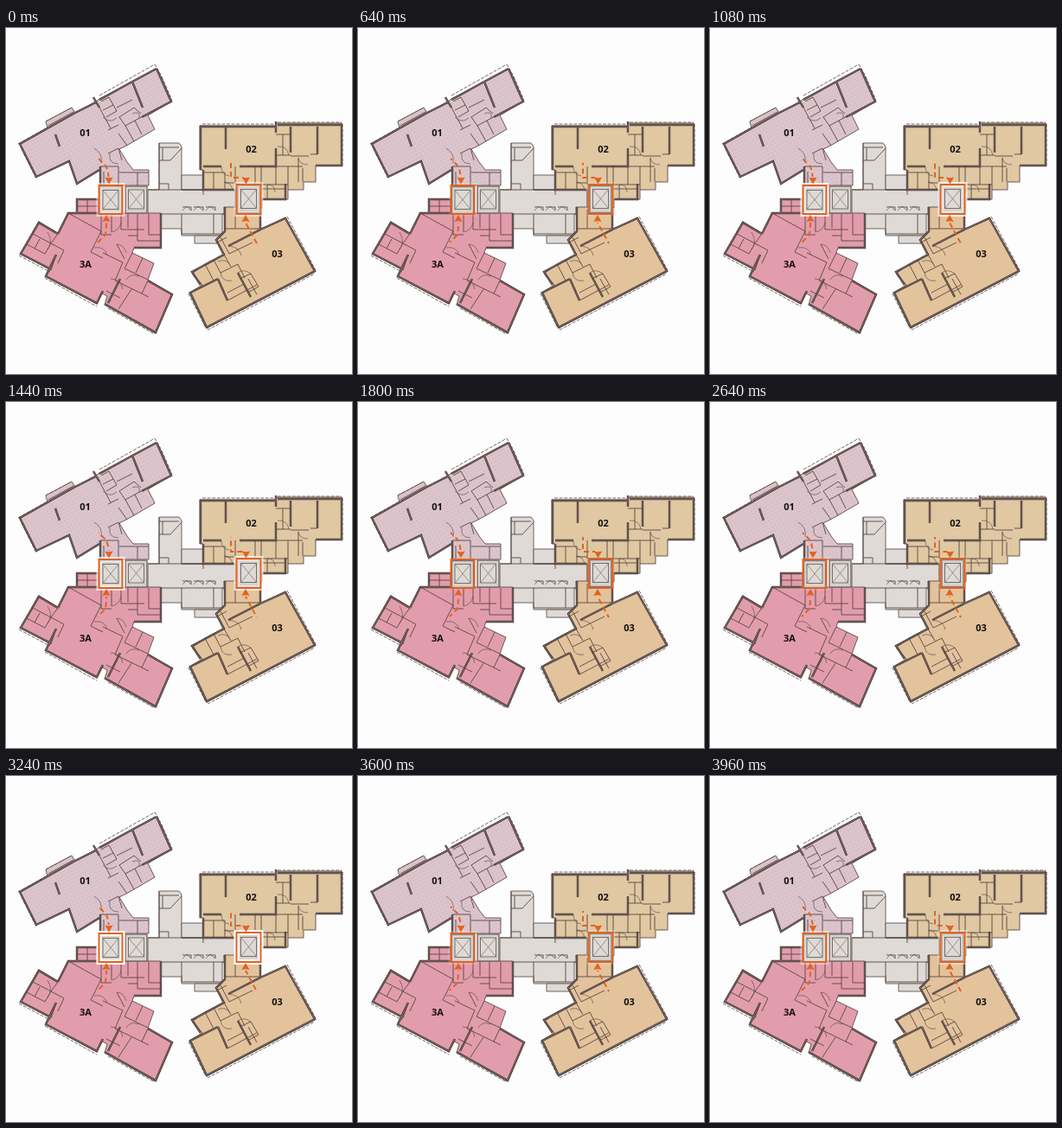
An HTML page for the animation above (4000 ms loop, 400 by 400 pixels).

```html
<!DOCTYPE html>
<html lang="en">
<head>
<meta charset="utf-8">
<title>Floor plan</title>
<style>
  html, body { margin: 0; width: 100%; height: 100%; overflow: hidden; background: #fdfdfd; }
  svg { display: block; width: 100vw; height: 100vh; }
  .unit { stroke: #5c4944; stroke-width: .9; }
  .wall { fill: none; stroke: #40322f; stroke-width: 2.4; }
  .cavity { fill: none; stroke: #a38f88; stroke-width: .7; }
  .thin { fill: none; stroke: #5a4742; stroke-width: .9; }
  .door { fill: none; stroke: #66534d; stroke-width: .7; }
  .eave { fill: none; stroke: #665a58; stroke-width: .9; stroke-dasharray: 4 1.6; }
  .core { fill: #dfdad6; stroke: #6b6562; stroke-width: 1; }
  .label { font: bold 11px "Open Sans", "Noto Sans", sans-serif; text-anchor: middle; fill: #15100f; }
  .route { fill: none; stroke: #e4621f; stroke-width: 2; stroke-dasharray: 6 4; animation: march 1s linear infinite; }
  .head { fill: #e4621f; }
  .frame { fill: none; stroke: #e4621f; stroke-width: 2; }
  .glow { fill: none; stroke: #fff; stroke-width: 6; animation: pulse .5s -.25s ease-in-out infinite alternate; }
  @keyframes march { to { stroke-dashoffset: -10px; } }
  @keyframes pulse { from { opacity: 0; } to { opacity: 1; } }
</style>
</head>
<body>
<svg viewBox="0 0 400 400">
  <defs>
    <pattern id="dots" width="4" height="4" patternUnits="userSpaceOnUse" patternTransform="rotate(-29)">
      <rect width="4" height="4" fill="#dac9d0"/>
      <circle cx="1" cy="1" r=".65" fill="#dc94a8"/>
      <circle cx="3" cy="3" r=".5" fill="#dfa9b8"/>
    </pattern>
    <g id="cabin">
      <rect width="25" height="31" fill="#d8d2ce" stroke="#766b66" stroke-width="1.4"/>
      <rect x="3.5" y="4" width="18" height="22" fill="#dfdad6" stroke="#6c6663" stroke-width=".9"/>
      <path d="M3.5 4L21.5 26M21.5 4L3.5 26" stroke="#77716e" stroke-width=".7"/>
    </g>
    <path id="head" class="head" d="M0 0L-4.6-8Q0-6.4 4.6-8Z"/>
  </defs>

  <g id="core">
    <path class="core" d="M177 133H200L203 137V187H265V215H250V240H203V232H179V215H164V187H177Z"/>
    <path class="core" d="M203 170H228V187H203ZM218 240H250V249H218Z"/>
    <path class="thin" d="M177 138H200M181 138V153M177 153H190L203 139M164 187H265M164 215H252M203 215V238H250M240 215V238M228 187V193M188 187V180H177"/>
    <path class="thin" d="M177 133V187M203 187H228M204 207H214V211M217 207H228V211M231 207H242V211"/>
    <path class="door" d="M204 211L209 206L214 211M217 211L222 206L228 211M231 211L236 206L242 211"/>
  </g>

  <g id="unit01">
    <path class="unit" fill="url(#dots)" d="M16 134L48 116L46 108L76 92L80 98L104 85L108 82L146 62L173 47L179 56L191 85L164 101L172 117L148 131L141 135L131 140L140 155L147 164H165V182H109V164L82 180L73 154L35 172Z"/>
    <path class="eave" d="M14 134L46 116M46 108L76 92M108 78L172 42L179 54M18 140L35 174M180 56L192 84"/>
    <path class="wall" d="M104 86L80 98L16 134L35 172L73 154L82 180L108 164M101 80L108 92M108 83L146 62L174 47M146 62L158 92M174 47L191 85L157 103M57 123L62 137M109 182V160"/>
    <path class="thin" d="M49 113L78 97M108 92L121 116M110 85L119 80L128 96L116 103M112 95L124 89M128 92L146 83M131 103L148 92L156 99M131 103L138 113L160 101M149 107L157 123M138 113L148 131M118 118L130 112M130 122L140 136M118 145L130 139L134 153M109 160H130V182M113 166V182M131 167H165M152 167V182"/>
    <path class="door" d="M112 103Q120 111 128 104M146 99Q156 95 154 105M102 139Q112 145 110 156M120 145Q118 157 130 157"/>
  </g>

  <g id="unit02">
    <path class="unit" fill="#dfc8a2" d="M224 113H312V110H388V159H358V178H344V187H326V198H296V208H265V187H228V164H224Z"/>
    <path class="eave" d="M227 111H310M314 109H388M389 111V159"/>
    <path class="wall" d="M225 164V114H312M312 108V121M314 112H388V159H358M228 164V187H264M254 115V140M228 160H249M270 160H312V139M329 114V144M360 114V146M296 198H323V180"/>
    <path class="thin" d="M312 123H329M312 147H329M320 123V147M329 148H350M360 146H352M338 150V178M312 160V181H326M326 160V187M343 162V178M312 160H343M228 167H253V187M240 167V187M253 179H265M288 160V182M295 160V181H312M302 181V198M265 160V181M296 186H323"/>
    <path class="door" d="M314 137Q325 136 327 147M338 150Q339 158 349 158M249 160Q249 170 258 171M302 181Q311 181 311 190M252 178Q260 178 262 187"/>
  </g>

  <g id="unit3A">
    <path class="unit" fill="#e29dac" d="M17 261L38 224L60 237L72 214H82V198H107V214H179V254H148L146 260L171 272L164 291L192 308L173 353L114 320L117 310L110 306L105 319L46 287L58 262L52 280Z"/>
    <path class="eave" d="M15 263L51 282M45 289L105 322M118 324L172 354M19 258L38 223"/>
    <path class="wall" d="M52 279L17 261L38 225L60 238M58 262L46 287L105 318L112 304M60 238L72 214H107M82 214V198H107M114 319L173 352L192 308L164 292M118 318L132 290M179 214V254H148"/>
    <path class="thin" d="M31 238L52 249L60 238M24 250L45 261L52 249M39 244L33 255M52 249L67 257L60 272M94 198V214M82 206H107M110 235L98 259L112 266M72 214L110 235M110 215V239H122M122 215V236M133 215V233H160M152 215V246H179M165 215V239H179M141 214V231M141 240H152M112 260L135 271M128 250L137 267M135 271L126 292L165 311M164 292L157 307M146 260L137 278L164 291M158 266L150 283M145 302L130 325M116 304L132 312"/>
    <path class="door" d="M48 236Q55 248 48 256M102 254Q113 252 117 262M121 290Q133 290 135 302M139 291Q144 283 154 287M122 236Q131 234 133 225M128 250Q136 250 139 260"/>
  </g>

  <g id="unit03">
    <path class="unit" fill="#e3c39c" d="M252 207H294V233L323 219L357 282L232 347L212 306L227 297L215 284L230 273L251 262L243 245L253 234Z"/>
    <path class="eave" d="M233 349L357 284M325 218L358 280M211 307L231 347"/>
    <path class="wall" d="M294 233L323 220L357 281L232 346L213 306L245 290M294 214V233L257 252M253 207V235L243 245L252 262L215 282L225 297M283 311L268 283M245 290L256 315"/>
    <path class="thin" d="M230 273L240 292M240 268L248 283L268 273M248 242L258 261L285 248M252 262L260 276M268 273L276 289M280 290L290 308M256 315L290 297M256 306L275 296M283 284L292 299L281 305M253 232H294M265 210V232M270 290L283 284M244 248L255 242"/>
    <path class="door" d="M248 283Q250 294 261 292M268 283Q275 278 283 284M257 252Q270 253 272 263M245 270Q254 266 259 274"/>
  </g>

  <use href="#cabin" x="138" y="183"/>

  <g id="lifts">
    <use href="#cabin" x="108.5" y="183.5"/>
    <rect class="glow" x="107.5" y="182" width="27" height="33"/>
    <rect class="frame" x="107.5" y="182" width="27" height="33"/>
    <use href="#cabin" x="268" y="182.5"/>
    <rect class="glow" x="266.5" y="181" width="28" height="34"/>
    <rect class="frame" x="266.5" y="181" width="28" height="34"/>
  </g>

  <g id="routes">
    <path class="route" d="M107 151L115 159Q118 163 118.5 172"/>
    <path class="route" d="M260 156V173H274"/>
    <path class="route" d="M106 248L114 240Q116 237 116 225"/>
    <path class="route" d="M290 249L277 225"/>
    <use href="#head" x="119" y="180.5"/>
    <use href="#head" x="277.5" y="180.5"/>
    <use href="#head" transform="translate(116 216) scale(1 -1)"/>
    <use href="#head" transform="translate(277 216) scale(1 -1)"/>
  </g>

  <g class="label">
    <text x="91.5" y="125">01</text>
    <text x="283.5" y="144">02</text>
    <text x="92" y="276.5">3A</text>
    <text x="313.5" y="265">03</text>
  </g>
</svg>
<script>
  // Walls are drawn hollow: a lighter line runs along the middle of each dark one.
  for (const wall of document.querySelectorAll(".wall")) {
    const cavity = wall.cloneNode();
    cavity.setAttribute("class", "cavity");
    wall.after(cavity);
  }
</script>
</body>
</html>
```
